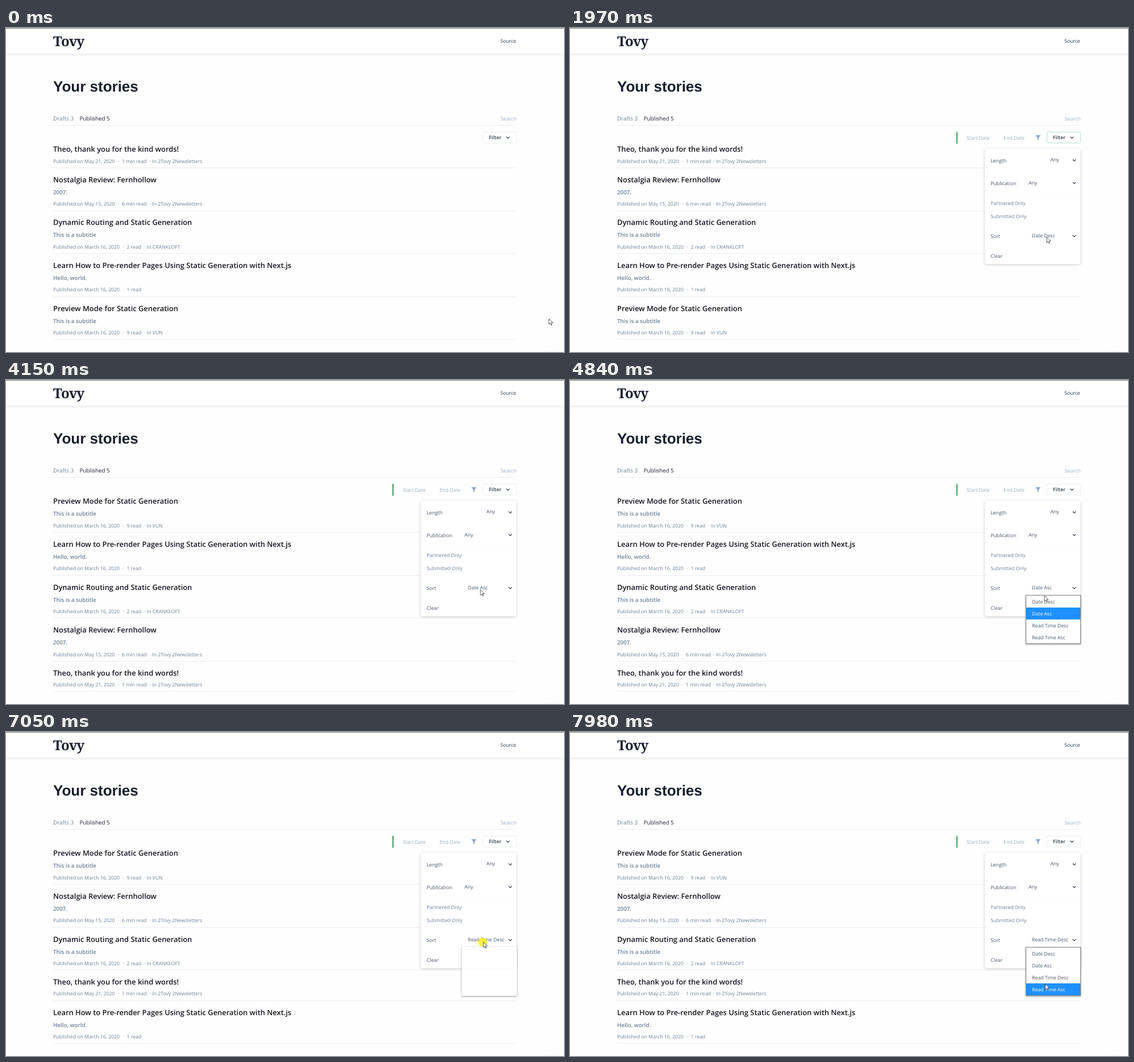
Animation of 982 by 571 pixels, one loop 8 s. Source, as an HTML page:

```html
<!DOCTYPE html>
<html lang="en">
<head>
<meta charset="utf-8">
<title>Your stories</title>
<style>
  html, body { margin: 0; width: 100%; height: 100%; overflow: hidden; background: #fefefe; }
  #stage {
    position: relative; width: 982px; height: 571px; overflow: hidden;
    font: 8.7px/20px "Open Sans", "Noto Sans", sans-serif;
    color: #718096; text-rendering: geometricPrecision;
  }
  #stage div, #stage svg { position: absolute; box-sizing: border-box; white-space: pre; }
  #stage .layer, svg.layer { left: 0; top: 0; width: 982px; height: 571px; }
  #header { left: 0; top: 0; width: 982px; height: 45px; background: #fff; border-top: 1px solid #777; box-shadow: 0 1px 5px rgba(0,0,0,.11); }
  #corner { left: 948px; top: 574px; width: 24px; height: 10px; box-shadow: 0 0 7px rgba(0,0,0,.14); }
  .rule { left: 83px; width: 815px; height: 1px; background: #edeff3; }
  .brand { font: 600 24px/20px "Noto Serif", serif; letter-spacing: -1px; color: #1a1d2e; }
  .h1 { font: bold 26px/20px "Liberation Sans", Arial, sans-serif; color: #1a1d2e; }
  .tab { font-size: 9.8px; }
  .title { font-size: 12.9px; font-weight: 600; color: #15171f; }
  .sub { font-size: 9.8px; font-weight: 600; }
  .dark { color: #1a202c; }
  .mid { color: #4a5568; }
  .pale { color: #a0aec0; }
  .bold { font-weight: 600; color: #2d3748; }
  .dot { margin: 0 5.1px; }
  .dot.tight { margin-right: 0; }
  #button { left: 839px; top: 183px; width: 60px; height: 20px; border: 1px solid #edf0f4; border-radius: 3px; background: #fff; }
  #bar { left: 680px; top: 183px; width: 1.5px; height: 21px; background: #38a169; }
  #panel { left: 730px; top: 213px; width: 168px; height: 203px; background: #fff; border-radius: 3px; box-shadow: 0 1px 5px rgba(0,0,0,.2); }
  #split { left: 730px; top: 293px; width: 168px; height: 1px; background: #f9fafb; }
  #popup { left: 802px; top: 379px; width: 96.5px; height: 85.5px; background: #fff; border: 1px solid #858585; box-shadow: 0 1px 3px rgba(0,0,0,.4); }
  #popup.blank { border-color: transparent; background: rgba(255,255,255,.85); }
  #popup.blank div { visibility: hidden; }
  #popup div { left: 0; width: 94.5px; height: 21px; line-height: 22px; padding-left: 10px; color: #4a5568; }
  #popup div.on { background: #1e90ff; color: #fff; }
  #click { left: -8px; top: -7.5px; width: 16px; height: 16px; border-radius: 50%; background: rgba(255,240,0,.75); }
  #pointer { left: 0; top: 0; width: 0; height: 0; }
  #pointer svg { left: 0; top: 0; overflow: visible; }
</style>
</head>
<body>
<div id="stage"></div>
<script>
const LOOP = 8000;
const stage = document.getElementById('stage');

function box(parent, id, cls = '', html = '') {
  const el = document.createElement('div');
  if (id) el.id = id;
  el.className = cls;
  el.innerHTML = html;
  parent.append(el);
  return el;
}

// Text with its left edge at x and its line centred on y.
function label(parent, x, y, text, cls = '') {
  const el = box(parent, '', cls, text);
  el.style.left = x + 'px';
  el.style.top = y - 10 + 'px';
  return el;
}

function rule(parent, y) {
  box(parent, '', 'rule').style.top = y + 'px';
}

function svg(parent, shapes, cls = 'layer') {
  parent.insertAdjacentHTML('beforeend', `<svg class="${cls}" width="982" height="571">${shapes}</svg>`);
}

const chevron = (x, y) =>
  `<path d="M${x - 2.8} ${y - 1.4}l2.8 2.8 2.8-2.8" fill="none" stroke="#2d3748" stroke-width="1.3"/>`;

const stories = [
  { title: 'Theo, thank you for the kind words!', date: 'May 21', read: '1 min read', place: '2Tovy 2Newsletters' },
  { title: 'Nostalgia Review: Fernhollow', sub: '2007.', date: 'May 15', read: '6 min read', place: '2Tovy 2Newsletters' },
  { title: 'Dynamic Routing and Static Generation', sub: 'This is a subtitle', date: 'March 16', read: '2 read', place: 'CRANKLOFT' },
  { title: 'Learn How to Pre-render Pages Using Static Generation with Next.js', sub: 'Hello, world.', date: 'March 16', read: '1 read' },
  { title: 'Preview Mode for Static Generation', sub: 'This is a subtitle', date: 'March 16', read: '9 read', place: 'VUN' }
];

function buildList(order) {
  const list = box(stage, '', 'layer');
  let y = 213.3;
  for (const i of order) {
    const s = stories[i];
    const extra = s.sub ? 22.2 : 0;
    label(list, 83, y, s.title, 'title');
    if (s.sub) label(list, 83, y + 23, s.sub, 'sub');
    const place = s.place ? `<span class="dot tight">·</span> In ${s.place}` : '';
    label(list, 83, y + 21.2 + extra, `Published on ${s.date}, 2020<span class="dot">·</span>${s.read}${place}`);
    rule(list, Math.round(y + 32.6 + extra));
    y += 53.4 + extra;
  }
  return list;
}

box(stage, 'header');
box(stage, 'corner');
label(stage, 83, 23.5, 'Tovy', 'brand');
label(stage, 870, 23, 'Source', 'bold').style.fontWeight = 400;
label(stage, 83, 103, 'Your stories', 'h1');
label(stage, 83, 159.5, 'Drafts 3', 'tab');
label(stage, 129.5, 159.5, 'Published 5', 'tab dark');
label(stage, 871, 159.5, 'Search', 'pale');
rule(stage, 171);

const lists = [[0, 1, 2, 3, 4], [4, 3, 2, 1, 0], [4, 1, 2, 0, 3]].map(buildList);

const button = box(stage, 'button');
label(stage, 850, 193.3, 'Filter', 'bold');
svg(stage, chevron(883.3, 193));

const menu = box(stage, '', 'layer');
box(menu, 'bar');
label(menu, 698, 193.8, 'Start Date', 'pale');
label(menu, 763, 193.8, 'End Date', 'pale');
box(menu, 'panel');
box(menu, 'split');
label(menu, 740.3, 233.5, 'Length', 'mid');
label(menu, 845.5, 232.3, 'Any', 'mid');
label(menu, 740.3, 273.5, 'Publication', 'mid');
label(menu, 807, 272.5, 'Any', 'mid');
label(menu, 740.3, 308.5, 'Partnered Only');
label(menu, 740.3, 332, 'Submitted Only');
label(menu, 740.3, 367, 'Sort', 'mid');
const value = label(menu, 812.8, 366, '', 'mid');
const clear = label(menu, 740.3, 402, 'Clear', 'mid');
svg(menu, [233, 273, 366.5].map(y => chevron(887.5, y)).join('') +
  '<path d="M819 189h9.2l-3.5 4.4v3.4l-2.2 1.2v-4.6z" fill="#90a9c9"/>');

const sorts = ['Date Desc', 'Date Asc', 'Read Time Desc', 'Read Time Asc'];
const popup = box(stage, 'popup');
const options = sorts.map((text, i) => {
  const el = box(popup, '', '', text);
  el.style.top = i * 21 + 'px';
  return el;
});

const pointer = box(stage, 'pointer');
const click = box(pointer, 'click');
svg(pointer, '<path d="M.5.5V10.2L2.8 8.1 4.4 11.8 6 11.1 4.4 7.5H7.5Z" fill="#fff" stroke="#333" stroke-width=".8"/>', '');

// time, x, y of the pointer tip
const path = [
  [0, 955, 512], [49, 955, 512], [50, 954, 511], [230, 954, 511], [840, 852, 190],
  [1110, 852, 190], [1830, 842, 357], [1850, 842, 357], [2010, 838, 370], [2070, 838, 371],
  [2600, 838, 371], [3060, 830, 411.5], [3860, 830, 411.5], [4150, 834.5, 369],
  [4650, 834.5, 369], [5360, 833.5, 428], [6250, 833.5, 428], [6810, 839.5, 369.5],
  [7340, 839.5, 369.5], [7980, 836, 443.5], [LOOP, 836, 443.5]
];
const clicks = [[1030, 1110], [2210, 2310], [3250, 3300], [4340, 4430], [5810, 5850], [7010, 7100]];
// blank, filled and closed times of the popup, with the chosen row
const opens = [[2260, 2310, 3390, 0], [4390, 4430, 5900, 1], [7050, 7100, LOOP, 2]];
const clearHover = [[3860, 4020], [6250, 6600]];

const within = (t, spans) => spans.some(([a, b]) => t >= a && t < b);
const stepAt = (t, ...times) => times.filter(s => t >= s).length;
const ease = k => k * k * (3 - 2 * k);
const show = (el, on) => { el.style.display = on ? '' : 'none'; };

function tipAt(t) {
  const i = path.findIndex(p => p[0] > t);
  const [t0, x0, y0] = path[i - 1], [t1, x1, y1] = path[i];
  const k = ease((t - t0) / (t1 - t0));
  return [x0 + (x1 - x0) * k, y0 + (y1 - y0) * k];
}

function render(t) {
  const [x, y] = tipAt(t);
  pointer.style.transform = `translate(${x}px, ${y}px)`;
  show(click, within(t, clicks));

  show(menu, t >= 1080);
  button.style.borderColor = t >= 1080 && t < 2260 ? '#b5e3d0' : '';
  clear.style.color = within(t, clearHover) ? '#1a202c' : '';

  const sort = stepAt(t, 3390, 5900);
  if (value.textContent !== sorts[sort]) value.textContent = sorts[sort];
  const order = stepAt(t, 3480, 5900);
  lists.forEach((el, i) => show(el, i === order));

  const open = opens.find(o => t >= o[0] && t < o[2]);
  show(popup, open);
  if (open) {
    popup.className = t < open[1] ? 'blank' : '';
    const row = y < 380 ? open[3] : Math.min(3, Math.floor((y - 380) / 21));
    options.forEach((el, i) => { el.className = i === row ? 'on' : ''; });
  }
}

const start = performance.now();
function tick() {
  render((performance.now() - start) % LOOP);
  requestAnimationFrame(tick);
}
render(0);
requestAnimationFrame(tick);
</script>
</body>
</html>
```
